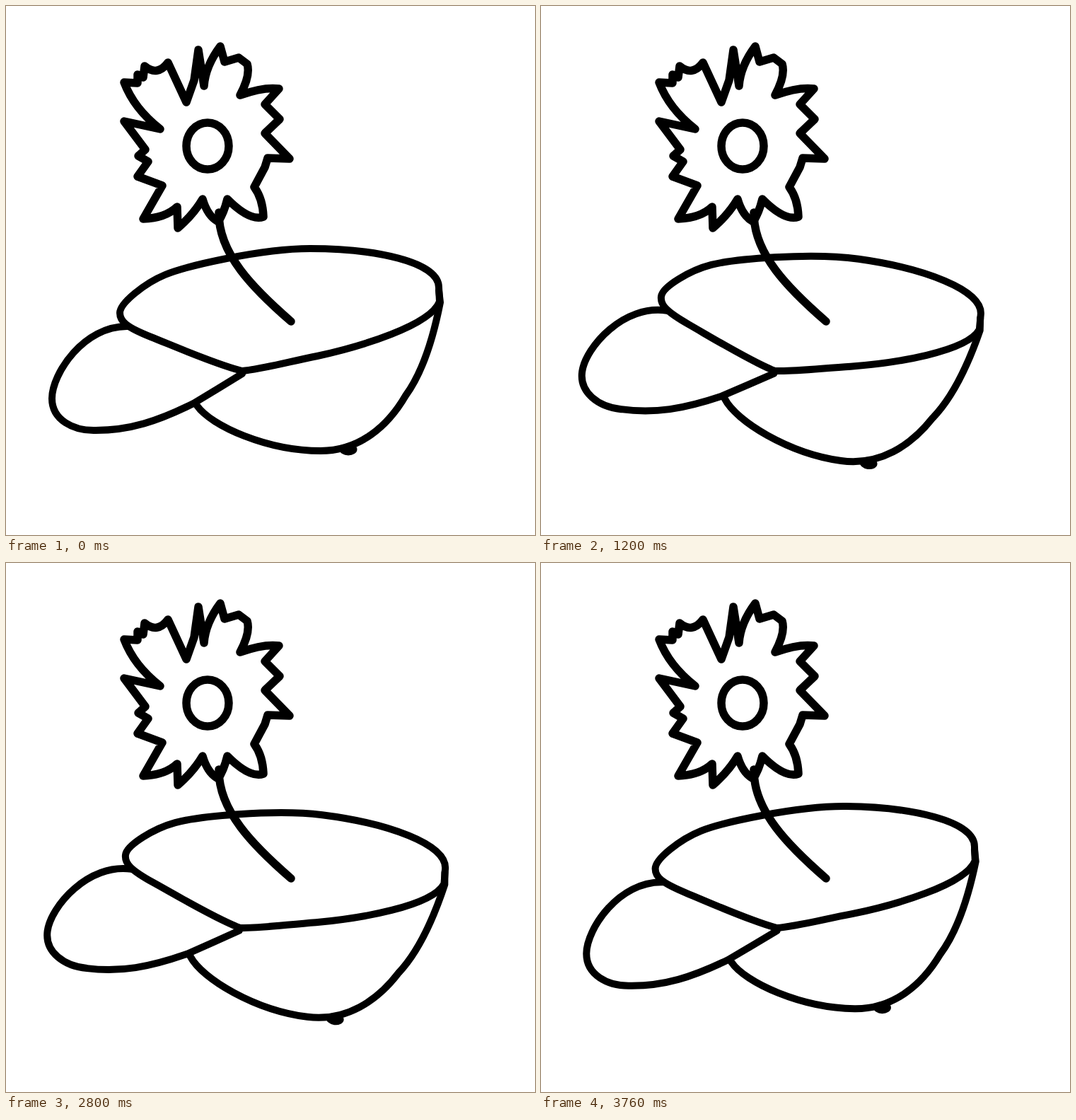
Write an HTML page that moves like this. It is 748 px wide and 748 px high and loops after 3840 ms.

```html
<!DOCTYPE html>
<html lang="en">
<head>
<meta charset="utf-8">
<title>Flower in a cap</title>
<style>
  html, body { margin: 0; width: 100%; height: 100%; overflow: hidden; background: #fff; }
  svg { display: block; width: 100%; height: 100%; fill: none; stroke: #000; stroke-linecap: round; stroke-linejoin: round; }
</style>
</head>
<body>
<svg viewBox="0 0 748 748">
  <g id="cap" stroke-width="10">
    <!-- rim, crown, brim, button -->
    <path d="M334 516C300 508 240 482 205 468S161 446 161 434C161 420 196 392 225 380S360 343 430 343
      C520 343 612 361 612 398L613 418C600 452 500 482 440 495C400 503 360 514 334 516"/>
    <path d="M612 402L614 419C606 460 592 514 565 551C540 594 500 629 445 629C370 629 290 594 270 565"/>
    <path d="M172 453C110 452 65 520 65 555C65 585 95 601 127 600C175 600 215 587 265 562Q300 541 334 520"/>
    <ellipse cx="484" cy="627" rx="12.5" ry="8.5" fill="#000" stroke="none"/>
  </g>
  <g stroke-width="11.5">
    <!-- petals, centre, stem -->
    <path d="M280 113L272 62L266 105L255 136L229 80Q214 100 196 85L194 101L186 97V109L167 108
      Q181 145 218 174Q190 168 167 163L197 203L187 212L201 220L186 241L221 254L194 301
      Q225 300 242 284L243 314Q265 295 278 273Q285 297 300 305Q308 293 313 273Q345 305 364 298
      Q363 272 351 256L366 228L370 215L401 216L366 180L387 160L366 139L386 117Q365 114 331 126
      Q346 98 341 82L329 73L309 79L303 57Q282 85 280 113"/>
    <ellipse cx="285" cy="198" rx="30" ry="33"/>
    <path d="M301 292C300 350 350 400 403 446"/>
  </g>
</svg>
<script>
const LOOP = 3840, STEP = 80, SWING = 9.6;
const cap = document.getElementById('cap');

function draw(now) {
  const t = Math.floor(now % LOOP / STEP) * STEP;
  const angle = SWING * Math.sin(Math.PI * t / LOOP);
  cap.setAttribute('transform', `rotate(${angle} 334 487)`);
  requestAnimationFrame(draw);
}
draw(performance.now());
</script>
</body>
</html>
```
